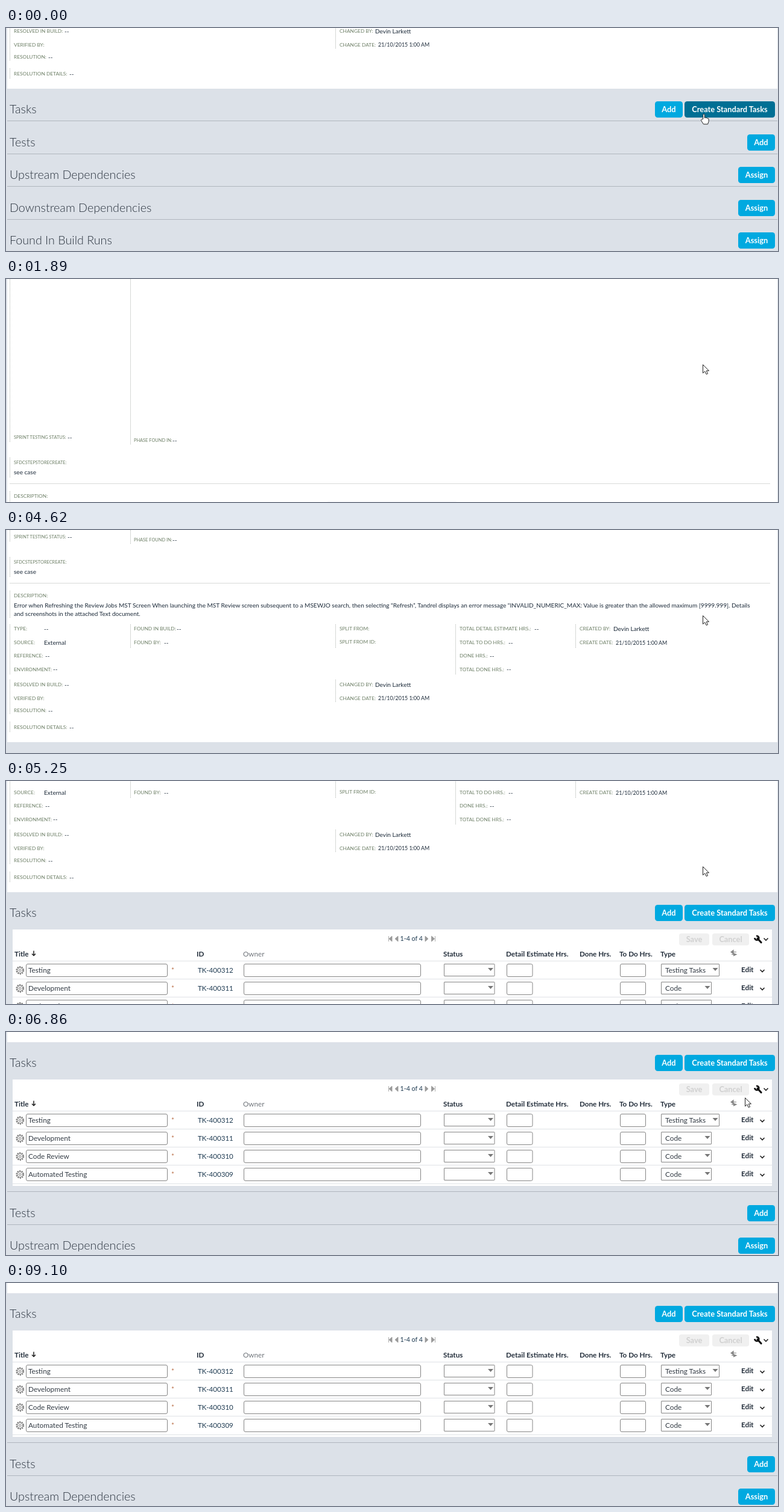
These frames come from a looping animation (1280x371 px, 9380 ms). An HTML page:

```html
<!DOCTYPE html>
<html lang="en">
<head>
<meta charset="utf-8">
<title>Create standard tasks</title>
<style>
  html, body { margin: 0; width: 100%; height: 100%; overflow: hidden; background: #fff; }
  svg { display: block; width: 1280px; height: 371px; font-family: Lato, "Open Sans", sans-serif; }
  text { white-space: pre; }
  .label { font-size: 8.35px; fill: #6d7f66; }
  .small { font-size: 7.4px; fill: #6d7f66; }
  .value { font-size: 10.05px; fill: #1d2b3a; }
  .date { font-size: 8.9px; fill: #1d2b3a; }
  .title { font-size: 19.7px; font-weight: 300; fill: #2c3540; }
  .button { font-size: 12.8px; font-weight: 700; fill: #fff; text-anchor: middle; }
  .head { font-size: 11.7px; font-weight: 700; fill: #222d3a; }
  .cell { font-size: 11.8px; fill: #343c45; }
  .id { font-size: 11.6px; fill: #1f3b52; }
  .count { font-size: 10.7px; fill: #1f3b52; }
  .field { fill: #fff; stroke: #858585; }
</style>
</head>
<body>
<svg viewBox="0 0 1280 371">
  <rect id="backdrop" width="1280" height="371" fill="#dce1e8"/>
  <g id="page">
    <rect id="panel" x="2" y="-400" width="1277" height="753" fill="#fff"/>
    <g id="details"></g>
    <g id="tasks"></g>
    <g id="table"></g>
    <g id="sections"></g>
  </g>
  <rect id="toast" x="532" y="369" width="216" height="20" rx="4" fill="#fafafc"/>
  <g id="cursor" stroke="#222" stroke-linejoin="round">
    <path id="arrow" fill="#fff" d="M0 0V14L3.3 11L5.6 16L8 15L5.8 10.2H10Z"/>
    <path id="hand" fill="#fff" d="M.2 9V2Q.2 .6 1.5 .6T2.8 2V7Q4 5.8 5.2 7.2Q6.4 6.4 7.4 7.8Q9.6 7.4 9.6 9.4V13L8 17.5H1L-2.6 12Q-3.6 9.8-2 9.4Z"/>
    <circle id="busy" cx="12" cy="0" r="4.7" fill="none" stroke="#2ba6d8" stroke-width="2.2"/>
  </g>
</svg>
<script>
const LOOP = 9380, STEP = 70;
const TABLE_SHIFT = 195, ROW_TOP = 468, ROW_H = 30.15;
const $ = id => document.getElementById(id);
const show = (el, on) => el.setAttribute("display", on ? "inline" : "none");

const text = (cls, x, y, str, extra = "") => `<text class="${cls}" x="${x}" y="${y}" ${extra}>${str}</text>`;
const rect = (x, y, w, h, extra) => `<rect x="${x}" y="${y}" width="${w}" height="${h}" ${extra}/>`;
const line = (x1, y1, x2, y2, color, extra = "") =>
  `<path d="M${x1} ${y1}L${x2} ${y2}" stroke="${color}" ${extra}/>`;
const shape = (d, extra) => `<path d="${d}" ${extra}/>`;
const field = (x, y, w, h = 21, r = 2.5) => rect(x, y, w, h, `rx="${r}" class="field"`);
const chevron = (x, y) => shape(`M${x - 3.5} ${y - 2}l3.5 3.5l3.5 -3.5`, 'fill="none" stroke="#222" stroke-width="1.6"');

// Elements that react to the pointer: box in page space, plus what to do with the amount
const hovers = [];

function button(id, x, y, w, label, shifted) {
  hovers.push({ id, x, y, w, h: 27, shifted, apply: (el, p) => el.setAttribute("fill", mix(p)) });
  return rect(x, y, w, 27, `id="${id}" rx="4.5" fill="#00a9e0"`) + text("button", x + w / 2, y + 17.8, label);
}

function mix(p) {
  const [r, g, b] = [[0, 0], [169, 111], [224, 148]].map(([from, to]) => Math.round(from + (to - from) * p));
  return `rgb(${r},${g},${b})`;
}

function buildDetails() {
  const date = "21/10/2015 1:00 AM", person = "Devin Larkett";
  const fields = [
    [13, 11, "SPRINT TESTING STATUS:", 102, "--"], [212, 16, "PHASE FOUND IN:", 276, "--"],
    [13, 53, "SFDCSTEPSTORECREATE:", 13, ""], [13, 109, "DESCRIPTION:", 13, ""],
    [13, 164, "TYPE:", 63, "--"], [13, 187, "SOURCE:", 63, "External"],
    [13, 209, "REFERENCE:", 65, "--"], [13, 231.5, "ENVIRONMENT:", 78, "--"],
    [212, 164, "FOUND IN BUILD:", 283, "--"], [212, 187, "FOUND BY:", 262, "--"],
    [553, 164, "SPLIT FROM:", 0, ""], [553, 186, "SPLIT FROM ID:", 0, ""],
    [752, 164, "TOTAL DETAIL ESTIMATE HRS.:", 876, "--"], [752, 187, "TOTAL TO DO HRS.:", 833, "--"],
    [752, 209, "DONE HRS.:", 802, "--"], [752, 231.5, "TOTAL DONE HRS.:", 830, "--"],
    [951, 164, "CREATED BY:", 1007, person], [951, 187, "CREATE DATE:", 1011, date],
    [13, 257, "RESOLVED IN BUILD:", 97, "--"], [13, 279.5, "VERIFIED BY:", 0, ""],
    [13, 300, "RESOLUTION:", 70, "--"], [13, 328, "RESOLUTION DETAILS:", 105, "--"],
    [553, 257, "CHANGED BY:", 612, person], [553, 279.5, "CHANGE DATE:", 617, date]
  ];
  const dotted = [
    [6.5, -252, 20], [6.5, 45, 78], [6.5, 101, 146], [6.5, 157, 240], [6.5, 249, 307], [6.5, 319, 337],
    [206.5, -252, 23], [206.5, 157, 196], [546.5, 157, 196], [546.5, 249, 287], [745.5, 157, 240], [944.5, 157, 196]
  ];
  const prose = [
    [72.5, "see case"],
    [128.7, "Error when Refreshing the Review Jobs MST Screen When launching the MST Review screen subsequent to a MSEWJO search, then selecting “Refresh”, Tandrel displays an error message “INVALID_NUMERIC_MAX: Value is greater than the allowed maximum [9999.999]. Details"],
    [142.5, "and screenshots in the attached Text document."]
  ];
  $("details").innerHTML =
    dotted.map(([x, a, b]) => line(x, a, x, b, "#adb2ad", 'stroke-dasharray="1 1"')).join("") +
    line(6, 88.5, 1267, 88.5, "#d8dad8") +
    fields.map(([x, y, label, vx, value]) =>
      text(y < 60 ? "small" : "label", x, y + 3, label) +
      (value && text(value === date ? "date" : "value", vx, y + 3.6, value))).join("") +
    prose.map(([y, str]) => text("value", 13, y, str)).join("");
}

function buildSections() {
  const rows = [["Tests", "Add"], ["Upstream Dependencies", "Assign"],
    ["Downstream Dependencies", "Assign"], ["Found In Build Runs", "Assign"]];
  $("tasks").innerHTML = text("title", 6, 394, "Tasks") +
    button("add", 1076, 374, 46, "Add") + button("create", 1125, 374, 150, "Create Standard Tasks");
  $("sections").innerHTML = line(2, 406.5, 1279, 406.5, "#b0b6be") + rows.map(([title, label], i) => {
    const y = (i + 1) * 54.6, w = label === "Add" ? 46 : 61;
    const rule = Math.round(406 + y) + .5;
    return text("title", 6, 394 + y, title) +
      button("section" + i, 1275 - w, Math.round(374 + y), w, label, true) +
      line(2, rule, 1279, rule, "#b0b6be");
  }).join("");
}

function select(x, y, w, label) {
  return field(x, y, w, 20, .5) + text("cell", x + 6.5, y + 14, label) +
    shape(`M${x + w - 11} ${y + 6.5}h9l-4.5 5z`, 'fill="#777"');
}

function taskRow(title, i) {
  const top = ROW_TOP + i * ROW_H, y = Math.round(top + 4) + .5, mid = y + 10.5;
  const name = "row" + i;
  hovers.push({ id: name, x: 11, y: top, w: 1258, h: ROW_H, table: true, instant: true,
    apply: (el, p) => el.setAttribute("opacity", p) });
  hovers.push({ id: name + "edit", x: 11, y: top, w: 1258, h: ROW_H, table: true,
    apply: (el, p) => { el.setAttribute("opacity", p); show($(name + "plain"), p === 0); } });
  return rect(11, top, 1259, ROW_H, `id="${name}" fill="#dce1e8"`) +
    line(11, Math.round(top + ROW_H) - .5, 1270, Math.round(top + ROW_H) - .5, "#dfe2e6") +
    `<g fill="none" stroke="#777"><circle cx="23.3" cy="${mid}" r="5.9" stroke-width="2" stroke-dasharray="2.2 1.5"/>
      <circle cx="23.3" cy="${mid}" r="4.4"/><circle cx="23.3" cy="${mid}" r="1.8"/></g>` +
    field(33.5, y, 234) + text("cell", 37, y + 14.7, title) +
    text("cell", 274, y + 14, "*", 'style="fill:#b5673f"') +
    text("id", 318, y + 14, "TK-4003" + (12 - i).toString().padStart(2, "0")) +
    field(394.5, y, 293) + select(726.5, y, 83.5, "") + field(830.5, y, 42.5) + field(1018.5, y, 42) +
    select(1086.5, y, i ? 83 : 96, i ? "Code" : "Testing Tasks") +
    `<g id="${name}plain">${text("head", 1219, y + 13.8, "Edit")}${chevron(1254, mid + 1)}</g>` +
    `<g id="${name}edit">${rect(1212, y - .5, 51, 21, 'rx="3.5" fill="#00a9e0"')}` +
    text("head", 1219, y + 13.8, "Edit", 'style="fill:#fff" opacity=".7"') +
    line(1245.5, y, 1245.5, y + 20, "#5cc8ec") +
    shape(`M1250.5 ${mid - 1}l3.5 3.5l3.5 -3.5`, 'fill="none" stroke="#fff" stroke-width="1.6" opacity=".7"') + "</g>";
}

function buildTable() {
  const heads = [[14, "Title"], [316, "ID"], [393, "Owner"], [725, "Status"], [829, "Detail Estimate Hrs."],
    [951, "Done Hrs."], [1017, "To Do Hrs."], [1085, "Type"]];
  const disabled = (x, w, label) => rect(x, 421.5, w, 20, 'rx="4" fill="#f0f0f0"') +
    text("button", x + w / 2, 436, label, 'style="fill:#d0d0d0"');
  $("table").innerHTML = rect(11, 415, 1259, 177, 'fill="#fff"') +
    shape("M634.5 426v9M640 426v9l-5-4.5zM650 426v9l-5-4.5zM695 426v9l5-4.5zM705.5 426v9l5-4.5zM711.5 426v9",
      'fill="#999" stroke="#999" stroke-width=".8"') +
    text("count", 653.5, 433.7, "1-4 of 4") + disabled(1116, 50, "Save") + disabled(1171, 61, "Cancel") +
    shape("M1246 430L1252 436.5", 'stroke="#111" stroke-width="3.2" stroke-linecap="round"') +
    shape("M1244 426A3.4 3.4 0 1 1 1241.5 429", 'fill="none" stroke="#111" stroke-width="2.7"') +
    chevron(1260, 431.5) +
    heads.map(([x, str]) => text("head", x, 459.5, str,
      str === "Owner" ? 'style="font-weight:400;fill:#70757b"' : "")).join("") +
    shape("M46 450.5v8M43 455.5l3 3l3-3", 'fill="none" stroke="#222" stroke-width="1.5"') +
    shape("M1206 449.5l-4 3l4 3zM1205 452.5h6M1203 456.5h5M1206 454.5l5 2l-5 2.5", 'fill="#888" stroke="#888" stroke-width="1.2"') +
    line(11, 467.5, 1270, 467.5, "#dfe2e6") +
    ["Testing", "Development", "Code Review", "Automated Testing"].map(taskRow).join("");
}

const scrolls = [[0, 252], [1400, -252], [2660, -168], [2800, -84], [2870, 0],
  [5110, 84], [5250, 168], [5390, 252], [5810, 336]];
const scrollAt = t => scrolls.filter(([at]) => at <= t).pop()[1];

const path = [[0, 1155.5, 142.5], [6300, 1155.5, 142.5], [6580, 1178, 71], [6790, 1222, 95], [7000, 1236, 150],
  [7280, 1240, 261], [7560, 1241, 259], [7770, 1244, 253.5], [8050, 1237, 142], [8330, 1246, 262],
  [8540, 1256, 305], [8750, 1259, 373], [LOOP, 1259, 373]];

function pointerAt(t) {
  const i = path.findIndex(([at]) => at > t);
  const [t0, x0, y0] = path[i - 1], [t1, x1, y1] = path[i];
  const k = (t - t0) / (t1 - t0), e = k * k * (3 - 2 * k);
  return [x0 + (x1 - x0) * e, y0 + (y1 - y0) * e];
}

function isOver(h, t) {
  const [x, y] = pointerAt(t), loaded = t >= 1400;
  if (h.table && !loaded) return false;
  const dy = y + scrollAt(t) - h.y - (h.shifted && loaded ? TABLE_SHIFT : 0);
  return x >= h.x && x < h.x + h.w && dy >= 0 && dy < h.h;
}

// Share of the recent past spent over the box, which gives a linear fade
function hoverAmount(h, t) {
  const samples = h.instant ? 1 : 6;
  let hits = 0;
  for (let k = 0; k < samples; k++) hits += isOver(h, Math.max(0, t - k * STEP));
  return hits / samples;
}

function render(t) {
  const loaded = t >= 1400;
  $("backdrop").setAttribute("fill", t >= 1400 && t < 1540 ? "#fff" : "#dce1e8");
  show($("page"), t < 1400 || t >= 1610);
  show($("details"), t < 1400 || t >= 1890);
  show($("table"), loaded);
  show($("toast"), t >= 1890 && t < 4620);
  $("page").setAttribute("transform", `translate(0 ${-scrollAt(t)})`);
  $("sections").setAttribute("transform", `translate(0 ${loaded ? TABLE_SHIFT : 0})`);
  for (const h of hovers) h.apply($(h.id), hoverAmount(h, t));

  const hand = t < 700 || (t >= 910 && t < 1120);
  show($("hand"), hand);
  show($("arrow"), !hand);
  show($("busy"), t >= 700 && t < 770);
  $("cursor").setAttribute("transform", `translate(${pointerAt(t).map(v => Math.round(v - .5) + .5).join(" ")})`);
}

buildDetails();
buildSections();
buildTable();

const start = performance.now();
function tick() {
  const t = (performance.now() - start) % LOOP;
  render(Math.floor(t / STEP) * STEP);
  requestAnimationFrame(tick);
}
tick();
</script>
</body>
</html>
```
